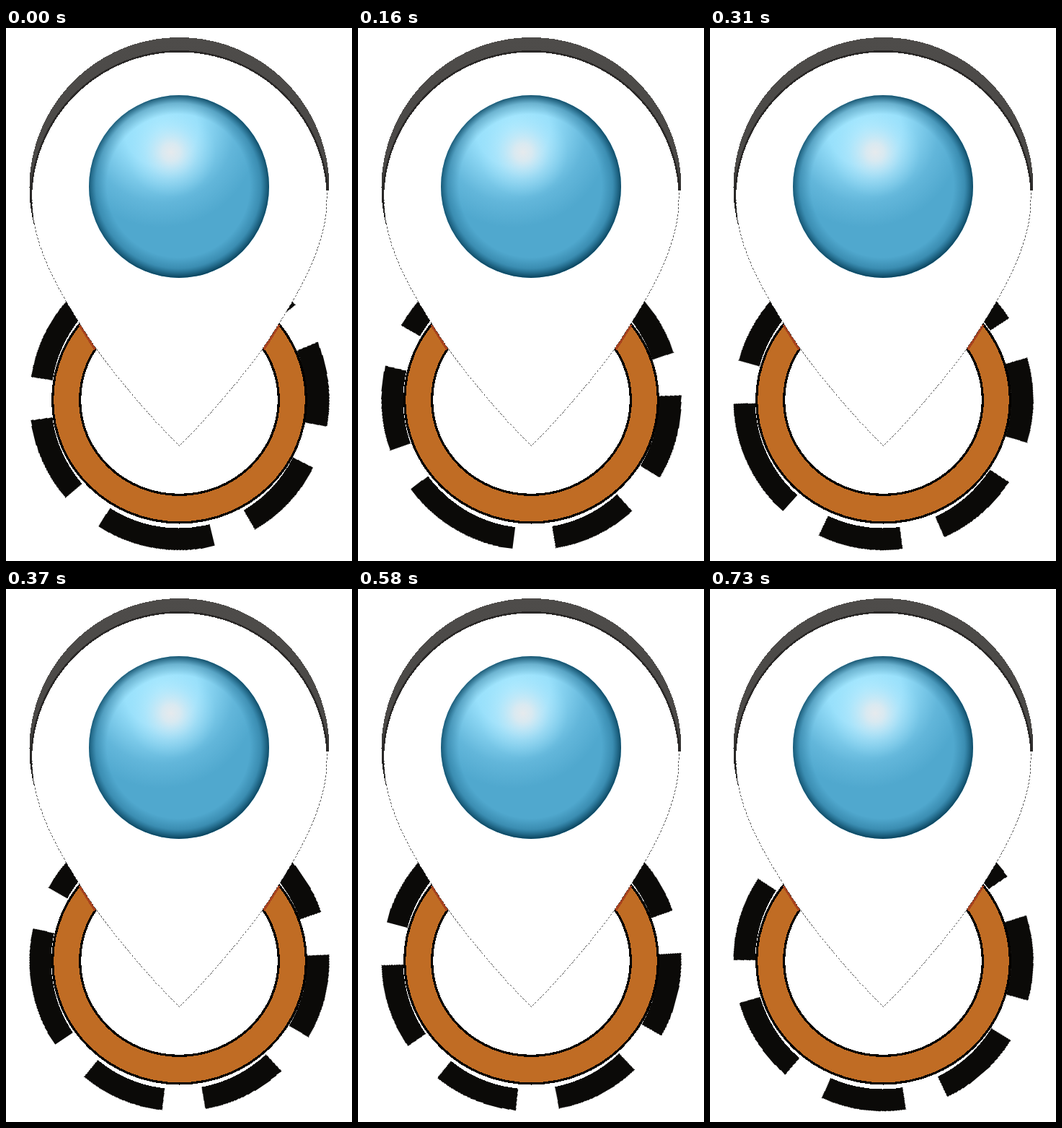
An HTML page that plays this animation: 480x738 px, repeating every 760 ms.

```html
<!DOCTYPE html>
<html lang="en">
<head>
<meta charset="utf-8">
<title>Location pin</title>
<style>
  html, body { margin: 0; width: 100%; height: 100%; overflow: hidden; background: #fff; }
  svg { display: block; width: 100vw; height: 100vh; shape-rendering: crispEdges; }
  #dashes { transform-origin: 240.5px 515px; transform: rotate(76.3deg); }
  #sphere { shape-rendering: auto; }
</style>
</head>
<body>
<svg viewBox="0 0 480 738">
  <defs>
    <linearGradient id="rim" gradientUnits="userSpaceOnUse" x1="0" y1="13" x2="0" y2="272">
      <stop offset="0" stop-color="#4e4c4a"/>
      <stop offset=".68" stop-color="#4a4846"/>
      <stop offset=".9" stop-color="#1c1b1a"/>
    </linearGradient>
    <radialGradient id="ball" gradientUnits="userSpaceOnUse" cx="215" cy="140" r="170">
      <stop offset="0" stop-color="#a4e8ff"/>
      <stop offset=".3" stop-color="#98e0fb"/>
      <stop offset=".6" stop-color="#62b6da"/>
      <stop offset=".8" stop-color="#50a8ce"/>
    </radialGradient>
    <radialGradient id="shine" gradientUnits="userSpaceOnUse" cx="229" cy="172" r="62">
      <stop offset="0" stop-color="#e6eaed"/>
      <stop offset=".2" stop-color="#dfeaf0" stop-opacity=".9"/>
      <stop offset=".6" stop-color="#c4eafa" stop-opacity=".35"/>
      <stop offset="1" stop-color="#a4e4fc" stop-opacity="0"/>
    </radialGradient>
    <radialGradient id="edge" gradientUnits="userSpaceOnUse" cx="239" cy="218.5" r="127">
      <stop offset=".78" stop-color="#125a7c" stop-opacity="0"/>
      <stop offset=".9" stop-color="#125a7c" stop-opacity=".34"/>
      <stop offset="1" stop-color="#0b455f"/>
    </radialGradient>
    <clipPath id="crescent"><path d="M0 0H480V225H240V272H0z"/></clipPath>
  </defs>

  <circle id="dashes" cx="240.5" cy="515" r="192.25" pathLength="360" fill="none"
    stroke="#0b0a08" stroke-width="31.5"/>

  <ellipse cx="239.5" cy="515" rx="177" ry="177.5" fill="#fff"/>
  <ellipse cx="240.5" cy="515" rx="177.5" ry="171.5"/>
  <ellipse cx="240.5" cy="515" rx="174.3" ry="168.3" fill="#c06c24"/>
  <ellipse cx="240.5" cy="515" rx="139.5" ry="133"/>
  <ellipse cx="240.5" cy="515" rx="136.3" ry="129.8" fill="#fff"/>
  <path d="M103.5 410L125 444M377.5 410L356 444" stroke="#a8421e" stroke-width="7"/>

  <g clip-path="url(#crescent)">
    <circle cx="240.5" cy="221" r="208" fill="url(#rim)"/>
    <path d="M36 238A204.5 204.5 0 0 1 445 238" fill="none" stroke="#2a2827" stroke-width="5"/>
  </g>
  <path fill="#fff" d="M36 238A204.5 204.5 0 0 1 445 238C445 310 395 385 356 444C321 492 281 538 240.5 579C200 538 160 492 125 444C86 385 36 310 36 238z"/>
  <path fill="none" stroke="#333" stroke-width=".8" stroke-dasharray="3 2"
    d="M445 228V238C445 310 395 385 356 444C321 492 281 538 240.5 579C200 538 160 492 125 444C86 385 36 310 36 238"/>

  <g id="sphere"></g>
</svg>
<script>
  const STEP = 6.98, STEPS = 22, HOLD = 100, LOOP = 760, START = 76.3;
  const dashes = document.getElementById('dashes');
  const sphere = document.getElementById('sphere');

  // One long dash followed by six short ones, in degrees.
  dashes.setAttribute('stroke-dasharray', '46.4 16.6 ' + '32.9 16.6 '.repeat(6).trim());

  // Base colour, highlight and dark rim share one disc.
  sphere.innerHTML = ['ball', 'shine', 'edge']
    .map(id => `<ellipse cx="240" cy="219.5" rx="125" ry="126.5" fill="url(#${id})"/>`)
    .join('');

  const turn = deg => `rotate(${START + deg}deg)`;
  dashes.animate([
    { offset: 0, transform: turn(0), easing: 'step-end' },
    { offset: HOLD / LOOP, transform: turn(0), easing: `steps(${STEPS}, jump-start)` },
    { offset: 1, transform: turn(STEP * STEPS) }
  ], { duration: LOOP, iterations: Infinity });
</script>
</body>
</html>
```
